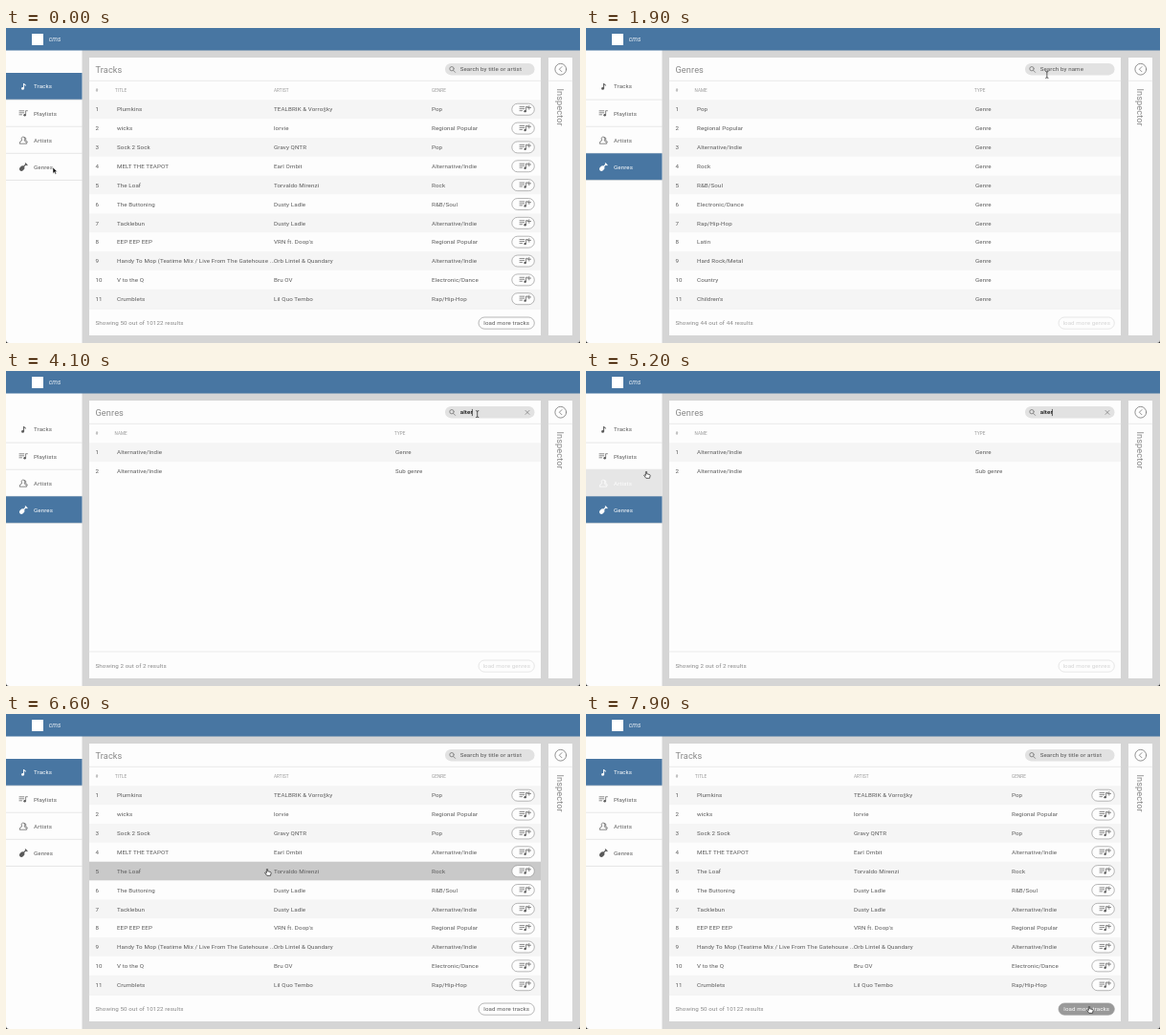
These frames come from a looping animation (600 px wide and 330 px high, 8000 ms). An HTML page:

```html
<!DOCTYPE html>
<html lang="en">
<head>
<meta charset="utf-8">
<style>
html, body { margin: 0; overflow: hidden; background: #fff; }
svg { display: block; width: 600px; height: 330px; font: 6.2px Roboto, Arial, sans-serif; letter-spacing: .1px; }
text { white-space: pre; }
.title { font-size: 9.2px; fill: #888; }
.head { font-size: 4.6px; fill: #999; }
.line { fill: none; stroke-width: .7; stroke-linecap: round; }
</style>
</head>
<body>
<svg id="stage" viewBox="0 0 600 330"></svg>
<script>
const LOOP = 8000, STEP = 100, ROW = 19.85, TOP = 75.3;
const BLUE = '#4876a2', INK = '#5a5a5a', HOVER = '#c9c9c9';

const tracks = `Plumkins|TEALBRIK & Vorro$ky|Pop
wicks|lorvie|Regional Popular
Sock 2 Sock|Gravy QNTR|Pop
MELT THE TEAPOT|Earl Ombit|Alternative/Indie
The Loaf|Torvaldo Mirenzi|Rock
The Buttoning|Dusty Ladle|R&B/Soul
Tacklebun|Dusty Ladle|Alternative/Indie
EEP EEP EEP|VRN ft. Doop's|Regional Popular
Handy To Mop (Teatime Mix / Live From The Gatehouse ...|Orb Lintel & Quandary|Alternative/Indie
V to the Q|Bru OV|Electronic/Dance
Crumblets|Lil Quo Tembo|Rap/Hip-Hop`.split('\n').map(s => s.split('|'));
const genres = ['Pop', 'Regional Popular', 'Alternative/Indie', 'Rock', 'R&B/Soul', 'Electronic/Dance',
  'Rap/Hip-Hop', 'Latin', 'Hard Rock/Metal', 'Country', 'Children\'s'].map(g => [g, 'Genre']);
const matches = [['Alternative/Indie', 'Genre'], ['Alternative/Indie', 'Sub genre']];

const trackPage = { title: 'Tracks', nav: 0, heads: ['TITLE', 'ARTIST', 'GENRE'], cols: [116, 280, 445], heads_x: [114, 280, 445],
  rows: tracks, count: '50 out of 10122', hint: 'Search by title or artist' };
const genrePage = { title: 'Genres', nav: 3, heads: ['NAME', 'TYPE'], cols: [116, 407], heads_x: [113.5, 406],
  rows: genres, count: '44 out of 44', hint: 'Search by name' };
const matchPage = { ...genrePage, rows: matches, count: '2 out of 2' };

// Pointer path: time, x, y
const path = [[0, 49, 146], [650, 49, 146], [1000, 357, 81], [1300, 430, 66], [2200, 500, 43], [4000, 500, 43],
  [4800, 330, 92], [5000, 300, 96], [5200, 63, 105], [5500, 46, 65], [5900, 46, 65], [6100, 66, 74],
  [6600, 273, 162], [6800, 273, 162], [7700, 526, 306], [LOOP, 526, 306]];
const keys = [2300, 2700, 2900, 3000, 3200];

const esc = s => s.replace(/&/g, '&amp;');
const text = (x, y, s, fill = INK, attrs = '') => `<text x="${x}" y="${y}" fill="${fill}" ${attrs}>${esc(s)}</text>`;
const rect = (x, y, w, h, fill, attrs = '') => `<rect x="${x}" y="${y}" width="${w}" height="${h}" fill="${fill}" ${attrs}/>`;
const line = (d, color, attrs = '') => `<path class="line" d="${d}" stroke="${color}" ${attrs}/>`;
const dot = (x, y, r, fill) => `<circle cx="${x}" cy="${y}" r="${r}" fill="${fill}"/>`;
const at = (x, y, s) => `<g transform="translate(${x} ${y})">${s}</g>`;

const listIcon = c => line('M0-2.6h4.8M0-.6h4.8M0 1.4h2.6M6.6 1.7v-4.4h1.8', c) + dot(5.6, 1.9, 1.2, c);
const icons = [
  c => line('M4.6 2v-5.2q.3 1.5 2 2', c, 'style="stroke-width:1"') + dot(3.5, 2.1, 1.4, c),
  listIcon,
  c => line('M.2 3.3q.2-2.4 2.3-2.8q-1.4-3.6 1.2-4q3 .2 1.4 4q2.2.4 2.5 2.8zM5.4-3.1q2.3.2 1.2 3.2q1.6.4 1.8 2.2', c),
  c => `<ellipse cx="2.7" cy="1.5" rx="3" ry="2.2" transform="rotate(-45 2.7 1.5)" fill="${c}"/>` +
    line('M3 1L7-3M6.4-3.6l1.6 1.6', c, 'style="stroke-width:1.3"')
];

function pointerAt(t) {
  const i = path.findIndex((p, n) => n && t <= p[0]);
  const [a, b] = [path[i - 1], path[i]];
  const k = (t - a[0]) / (b[0] - a[0]), e = k * k * (3 - 2 * k);
  return [a[1] + (b[1] - a[1]) * e, a[2] + (b[2] - a[2]) * e];
}

function sidebar(active, hover) {
  return ['Tracks', 'Playlists', 'Artists', 'Genres'].map((name, i) => {
    const y = 47 + 28.1 * i, on = i === active, lit = i === hover;
    const color = on || lit ? '#fff' : INK;
    return (on || lit ? rect(0, y, 79.5, 28.1, on ? BLUE : '#e6e6e6') : '') +
      line(`M0 ${y + 28.1}H79.5`, '#ddd') + at(14, y + 14.3, icons[i](color)) + text(29, y + 16.4, name, color);
  }).join('');
}

function search(page, typed, caret) {
  return rect(459, 37, 93.5, 12.4, '#e2e2e2', 'rx="6.2"') +
    line('M467.8 44.6l1.8 1.8M468.2 42.7a2.2 2.2 0 1 1-4.4 0a2.2 2.2 0 1 1 4.4 0', '#666') +
    (typed ? text(474.7, 45.4, typed, '#111', 'font-weight="500"') + line('M543 41.4l4 4m0-4l-4 4', '#777')
      : text(474.7, 45.4, page.hint, '#555')) +
    (caret ? line(`M${[474.6, 478.4, 480, 482.2, 485.4, 487.4][typed.length]} 40.3v6.4`, '#222') : '');
}

function table(page, hoverRow, hoverLoad) {
  const isTracks = page === trackPage;
  const rows = page.rows.map((cells, i) => {
    const y = TOP + ROW * i, mid = y + ROW / 2, base = mid + 2.2;
    const fill = i === hoverRow ? HOVER : i % 2 ? '#fdfdfd' : '#f5f5f5';
    const add = isTracks ? rect(528.8, mid - 6, 23.5, 12, '#fdfdfd', 'rx="6" stroke="#999" stroke-width=".7"') +
      at(537, mid, listIcon(INK) + line('M8-1.8h3.6M9.8-3.6v3.6', INK)) : '';
    return rect(87, y, 472, ROW, fill) + text(93.5, base, `${i + 1}`) +
      cells.map((s, c) => text(page.cols[c], base, s)).join('') + add;
  }).join('');
  const load = isTracks ? [hoverLoad ? '#999' : '#fdfdfd', '#999', hoverLoad ? '#fff' : INK] : ['#fdfdfd', '#ddd', '#d4d4d4'];
  return rect(87, 31, 472, 291, '#fdfdfd') + text(93.5, 46.7, page.title, '', 'class="title"') +
    line('M87 55.3H559M87 294H559', '#e2e2e2') + text(93.5, 67, '#', '', 'class="head"') +
    page.heads.map((s, i) => text(page.heads_x[i], 67, s, '', 'class="head"')).join('') + rows +
    text(93.5, 311.2, `Showing ${page.count} results`, '#888') +
    rect(494, 303, 58.3, 12.2, load[0], `rx="6.1" stroke="${load[1]}" stroke-width=".7"`) +
    text(523.2, 311.3, `load more ${page.title.toLowerCase()}`, load[2], 'text-anchor="middle"');
}

const inspector = rect(567, 31, 25, 291, '#fdfdfd') + line('M567 55.3h25', '#e2e2e2') +
  line('M585.7 43.2a5.9 5.9 0 1 1-11.8 0a5.9 5.9 0 1 1 11.8 0M581 40.6l-2.6 2.6l2.6 2.6', '#666') +
  text(0, 0, 'Inspector', '', 'class="title" transform="translate(576 63.5) rotate(90)"');
const header = rect(0, 0, 600, 23.5, BLUE) + rect(27, 6, 12, 12, '#fff') +
  text(44.7, 14.2, 'cms', '#e8eef4', 'font-style="italic" font-size="6.7"');
const corners = '<path d="M0 327q0 3 3 3H0zM600 327q0 3-3 3h3z" fill="#222"/>';

const shapes = {
  arrow: '<path d="M0 0v6.4l1.5-1.4l1.1 2.3l1.1-.5l-1.1-2.2h2z" fill="#111" stroke="#fff" stroke-width=".5"/>',
  hand: '<path d="M-.6.6q.6-1 1.2 0v2.2l2.9.7q.8.3.6 1.2l-.6 2.6h-3.7l-2.2-2.9q.2-.9 1-.4l.8.6z" fill="#fff" stroke="#222" stroke-width=".7"/>',
  beam: line('M-1.2-3.5q1.2 0 1.2.8q0-.8 1.2-.8M0-2.7v5.4M-1.2 3.5q1.2 0 1.2-.8q0 .8 1.2.8', '#222')
};

function draw(t) {
  const [x, y] = pointerAt(t);
  const page = t < 600 || t >= 5700 ? trackPage : t >= 3400 ? matchPage : genrePage;
  const typed = page === trackPage ? '' : 'alter'.slice(0, keys.filter(k => t >= k).length);
  const live = t >= 500, inPanel = x > 87 && x < 559;
  const row = inPanel && y >= TOP ? Math.floor((y - TOP) / ROW) : -1;
  const hoverRow = row < page.rows.length ? row : -1;
  const nav = live && x < 79.5 && y >= 47 ? Math.floor((y - 47) / 28.1) : -1;
  const hoverLoad = x > 494 && x < 552 && y > 303 && y < 315;
  const shape = x > 459 && x < 552 && y > 37 && y < 49 ? 'beam' : hoverRow >= 0 || nav >= 0 || hoverLoad ? 'hand' : 'arrow';
  const link = t >= 600 && t < 1400 ? 'genres' : t >= 5500 && t < 6400 ? 'tracks' : '';
  const hidden = t >= 2300 && t < 4000;
  stage.innerHTML = rect(0, 0, 600, 330, '#d5d5d5') + rect(0, 23, 79.5, 307, '#fdfdfd') + header +
    sidebar(page.nav, nav) + table(page, hoverRow, hoverLoad) +
    search(page, typed, t >= 2200 && t < 5000 || t >= 5000 && t < 5600) + inspector + corners +
    (link ? rect(-2, 321, 58, 11, '#3d4043', 'rx="2"') +
      text(1.3, 327.4, `localhost:3000/${link}`, '#eee', 'style="font:5.4px Arial,\'Liberation Sans\',sans-serif;letter-spacing:0"') : '') +
    (hidden ? '' : at(x, y, shapes[shape]));
}

let shown = -1;
function tick() {
  const t = Math.floor(performance.now() % LOOP / STEP) * STEP;
  if (t !== shown) draw(shown = t);
  requestAnimationFrame(tick);
}
tick();
</script>
</body>
</html>
```
